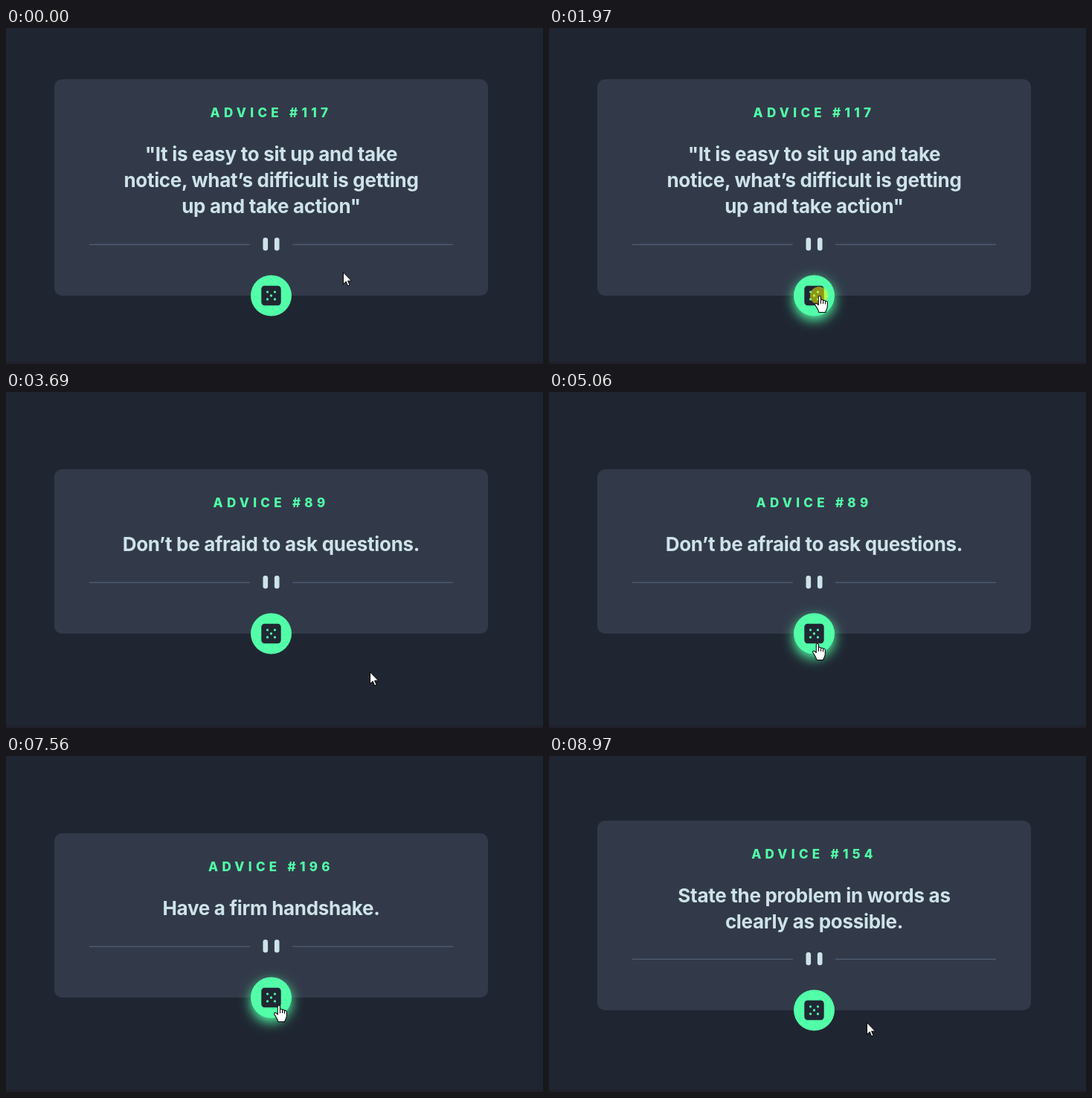
An HTML page for the animation above (9500 ms loop, 722 by 452 pixels).

```html
<!DOCTYPE html>
<html lang="en">
<head>
<meta charset="utf-8">
<title>Advice generator</title>
<style>
  html, body { margin: 0; width: 100%; height: 100%; overflow: hidden; background: #1f2632; }
  svg { display: block; }
  text { font-family: Inter, "Open Sans", sans-serif; text-anchor: middle; }
  #title { font-size: 17px; font-weight: 800; letter-spacing: 5.3px; fill: #52ffa8; }
  #quote { font-size: 26px; font-weight: 700; letter-spacing: -.3px; fill: #cee3e9; }
</style>
</head>
<body>
<svg width="722" height="452" viewBox="0 0 722 452">
  <defs>
    <filter id="blur" x="-50%" y="-50%" width="200%" height="200%">
      <feGaussianBlur stdDeviation="8"/>
    </filter>
  </defs>
  <rect width="722" height="452" fill="#1f2632"/>
  <rect y="449" width="722" height="3" fill="#201f2a"/>
  <rect id="card" x="65" width="583" rx="10" fill="#323a49"/>
  <text id="title" x="356.5"></text>
  <g id="quote"></g>
  <!-- origin: middle of the card's lower edge -->
  <g id="foot">
    <g transform="translate(-244.5 -78) scale(1.1014)">
      <path d="M0 8h196v1H0zM248 8h196v1H248z" fill="#4f5d74"/>
      <g fill="#cee3e9">
        <rect x="212" width="6" height="16" rx="3"/>
        <rect x="226" width="6" height="16" rx="3"/>
      </g>
    </g>
    <circle id="glow" cy="5.5" r="27.5" fill="#52ffa8" filter="url(#blur)"/>
    <circle r="27.5" fill="#52ffa8"/>
    <g transform="scale(1.1)">
      <rect x="-12" y="-12" width="24" height="24" rx="4" fill="#202733"/>
      <path d="M-4.5 -4.5h0M4.5 -4.5h0M0 0h0M-4.5 4.5h0M4.5 4.5h0"
        stroke="#52ffa8" stroke-width="3" stroke-linecap="round"/>
    </g>
  </g>
  <g id="cursor">
    <circle id="press" r="12" fill="#ff0" fill-opacity=".5"/>
    <path id="arrow" d="M.5 .8V16.6L4.2 13.1L6.7 19L9.1 18L6.6 12.2H11.6Z"
      fill="#fff" stroke="#000"/>
    <g id="hand" transform="translate(-6 0) scale(1.05)" stroke="#000" stroke-linejoin="round">
      <path fill="#fff" d="M6.5 .5C5.5 .5 5 1.2 5 2V12L3.5 10.5C2.5 9.7 1 9.8 .6 10.8C.4 11.5 .7 12 1.2 12.6L3.5 16.5
        C4.3 18 5.5 18.8 5.5 21.5H14C14 19 16.5 17.5 16.5 13.5V8.5c0-1.8-2.5-1.8-2.7-.5V7c-.2-1.5-2.6-1.5-2.8 0
        v-.8c-.2-1.5-2.6-1.5-2.9 0V2C8 1.2 7.5 .5 6.5 .5Z"/>
      <path fill="none" d="M8.1 6V10.5M11 7V10.5M13.8 8V11"/>
    </g>
  </g>
</svg>
<script>
const LOOP = 9500, STEP = 70, CX = 356.5, CY = 214.5, LINE = 35, RADIUS = 27.5, SAG = .12;
const $ = id => document.getElementById(id);

const advice = [
  { at: 0, id: 117, lines: ['"It is easy to sit up and take', 'notice, what’s difficult is getting', 'up and take action"'] },
  { at: 2570, id: 89, lines: ['Don’t be afraid to ask questions.'] },
  { at: 5930, id: 196, lines: ['Have a firm handshake.'] },
  { at: 8430, id: 154, lines: ['State the problem in words as', 'clearly as possible.'] }
];
const clicks = [1970, 5460, 7960];

const home = { x: 453, y: 328 };
const moves = [
  { start: 70, end: 130, x: 453, y: 331 },
  { start: 330, end: 1220, x: 363, y: 360 },
  { start: 2640, end: 2920, x: 375, y: 388 },
  { start: 2990, end: 3690, x: 489, y: 376 },
  { start: 3950, end: 5060, x: 360, y: 338 },
  { start: 6860, end: 6930, x: 365, y: 379 },
  { start: 7210, end: 7560, x: 366, y: 335 },
  { start: 8760, end: 8970, x: 427, y: 358 }
];

// Eased steps along a slightly sagging line
function glide(from, to, t) {
  const steps = Math.round((to.end - to.start) / STEP) + 1;
  const u = t >= to.end ? 1 : (Math.floor((t - to.start) / STEP) + 1) / steps;
  const k = (1 - Math.cos(Math.PI * u)) / 2;
  const dx = to.x - from.x, dy = to.y - from.y;
  const sag = SAG * Math.abs(dx) * Math.sin(Math.PI * k);
  return { x: Math.round(from.x + dx * k), y: Math.round(from.y + dy * k + sag) };
}

function pointerAt(t) {
  const i = moves.findLastIndex(m => t >= m.start);
  return i < 0 ? home : glide(moves[i - 1] || home, moves[i], t);
}

function layout(item) {
  const half = (186 + LINE * item.lines.length) / 2;
  return { top: Math.round(CY - half), bottom: Math.floor(CY + half) };
}

const show = (id, on) => $(id).setAttribute('visibility', on ? 'visible' : 'hidden');
const place = (id, x, y) => $(id).setAttribute('transform', `translate(${x} ${y})`);

function addLine(text, y) {
  const el = document.createElementNS('http://www.w3.org/2000/svg', 'text');
  el.setAttribute('x', CX);
  el.setAttribute('y', y);
  el.textContent = text;
  $('quote').append(el);
}

let shown;

function setAdvice(item, { top, bottom }) {
  if (item === shown) return;
  shown = item;
  $('card').setAttribute('y', top);
  $('card').setAttribute('height', bottom - top);
  $('title').setAttribute('y', top + 51);
  $('title').textContent = 'ADVICE #' + item.id;
  $('quote').replaceChildren();
  item.lines.forEach((line, i) => addLine(line, top + 109.5 + LINE * i));
  place('foot', CX, bottom);
}

function draw(t) {
  const item = advice.findLast(a => t >= a.at);
  const box = layout(item);
  setAdvice(item, box);
  const { x, y } = pointerAt(t);
  const over = Math.hypot(x - CX, y - box.bottom) < RADIUS;
  place('cursor', x, y);
  show('glow', over);
  show('hand', over);
  show('arrow', !over);
  show('press', clicks.some(c => t >= c && t < c + STEP));
}

const begin = performance.now();
function tick() {
  draw((performance.now() - begin) % LOOP);
  requestAnimationFrame(tick);
}
tick();
</script>
</body>
</html>
```
